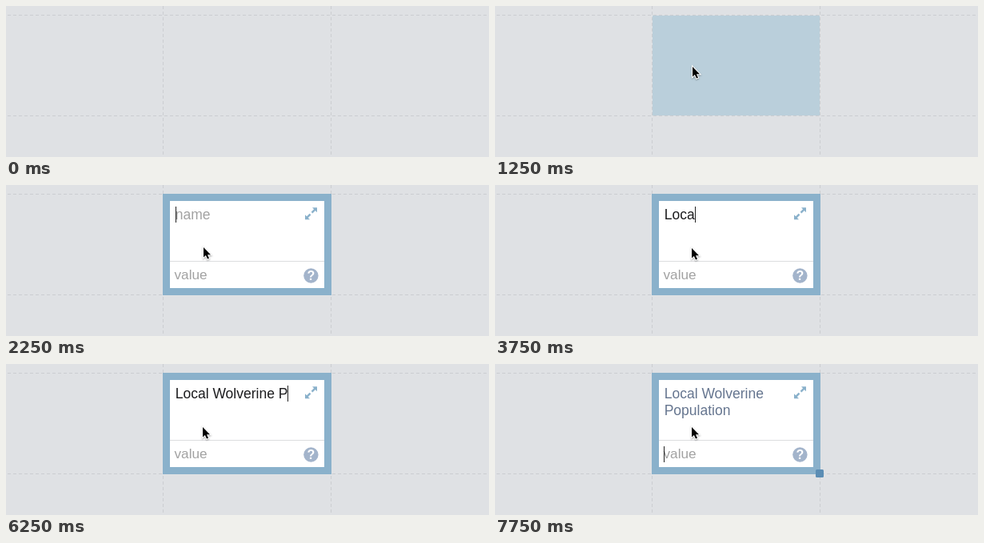
Animation of 604 by 189 pixels, one loop 8000 ms. Source, as an HTML page with a canvas:

```html
<!DOCTYPE html>
<html lang="en">
<head>
<meta charset="utf-8">
<title>Grid cell editor</title>
<style>
  html, body { margin: 0; width: 100%; height: 100%; overflow: hidden; background: #dfe1e4; }
  canvas { display: block; }
</style>
</head>
<body>
<canvas width="604" height="189"></canvas>
<script>
const ctx = document.querySelector('canvas').getContext('2d');
const LOOP = 8000, STEP = 250;
const FONT = '"Liberation Sans", Arial, sans-serif';
const BLUE = '#8ab1cb';

// [start time, text typed so far]
const typing = [
  [3250, 'L'], [3750, 'Loca'], [4000, 'Local '],
  [4500, 'Local W'], [4750, 'Local Wo'], [5000, 'Local Wol'], [5250, 'Local Wolv'], [5500, 'Local Wolver'],
  [5750, 'Local Wolverin'], [6000, 'Local Wolverine'], [6250, 'Local Wolverine P'], [6500, 'Local Wolverine Po'],
  [6750, 'Local Wolverine\nPop'], [7000, 'Local Wolverine\nPopul'],
  [7250, 'Local Wolverine\nPopulatio'], [7500, 'Local Wolverine\nPopulation']
];
// [start time, tip x, tip y]
const pointer = [
  [500, 238, 92], [750, 242, 84], [1000, 245, 78], [1250, 246, 75], [2250, 246, 77], [2500, 245, 78]
];

const latest = (track, t) => track.filter(key => key[0] <= t).pop();

function rect(color, x, y, w, h) {
  ctx.fillStyle = color;
  ctx.fillRect(x, y, w, h);
}

function polygon(points) {
  ctx.beginPath();
  points.forEach(([x, y]) => ctx.lineTo(x, y));
  ctx.closePath();
}

function text(string, x, baseline, color, size = 17.5) {
  ctx.font = `${size}px ${FONT}`;
  ctx.fillStyle = color;
  ctx.fillText(string, x, baseline);
}

const caret = (x, y) => rect('#222', Math.round(x), y, 1, 20);

function drawGrid() {
  rect('#dfe1e4', 0, 0, 604, 189);
  ctx.strokeStyle = '#cbcdd1';
  ctx.lineWidth = 1;
  ctx.setLineDash([4, 3]);
  ctx.beginPath();
  for (const y of [11.5, 137.5]) { ctx.moveTo(2, y); ctx.lineTo(604, y); }
  for (const x of [196.5, 406.5]) { ctx.moveTo(x, 0); ctx.lineTo(x, 189); }
  ctx.stroke();
  ctx.setLineDash([]);
}

function drawExpandIcon() {
  for (const turn of [0, Math.PI]) {
    ctx.save();
    ctx.translate(381.5, 35.7);
    ctx.rotate(turn);
    ctx.fillStyle = ctx.strokeStyle = BLUE;
    polygon([[1.5, -7.5], [7.5, -7.5], [7.5, -1.5]]);
    ctx.fill();
    ctx.lineWidth = 2.4;
    ctx.beginPath();
    ctx.moveTo(1, -1);
    ctx.lineTo(6, -6);
    ctx.stroke();
    ctx.restore();
  }
}

function drawHelpIcon() {
  ctx.fillStyle = '#a3b4cb';
  ctx.beginPath();
  ctx.arc(381.4, 113.5, 9.2, 0, 7);
  ctx.fill();
  ctx.textAlign = 'center';
  text('?', 381.4, 119, '#fff', 'bold 16');
  ctx.textAlign = 'left';
}

function drawEditor(t) {
  const typed = latest(typing, t);
  const valueFocused = t >= 7750;
  rect('#fff', 205, 20, 193, 109);
  rect('#dcdddf', 205, 95, 193, 1);
  drawExpandIcon();
  drawHelpIcon();
  text('value', 210.5, 118, '#a2a2a2', 17.2);

  if (typed) {
    const lines = typed[1].split('\n');
    lines.forEach((line, i) => text(line, 211.7, 43 + 21 * i, valueFocused ? '#65758f' : '#1c1c1e'));
    const last = lines.length - 1;
    if (!valueFocused) caret(211.7 + ctx.measureText(lines[last]).width, 27 + 21 * last);
  } else {
    text('name', 211.7, 43, '#a2a2a2');
    if (t < 2750) caret(212, 27);
  }

  if (valueFocused) {
    caret(211, 103);
    ctx.fillStyle = '#5b8db4';
    ctx.beginPath();
    ctx.roundRect(401, 132, 10, 10, 1.5);
    ctx.fill();
  }
}

function drawPointer(x, y) {
  ctx.save();
  ctx.translate(x + 1, y + 1);
  polygon([[0, 0], [0, 12.6], [2.9, 9.9], [5, 14.6], [7, 13.7], [5, 9.2], [9, 9.2]]);
  ctx.strokeStyle = '#fff';
  ctx.lineWidth = 2;
  ctx.shadowColor = 'rgba(0,0,0,.35)';
  ctx.shadowBlur = 2;
  ctx.shadowOffsetY = 1;
  ctx.stroke();
  ctx.shadowColor = 'transparent';
  ctx.fillStyle = '#000';
  ctx.fill();
  ctx.restore();
}

function draw(now) {
  const t = Math.floor(now % LOOP / STEP) * STEP;
  drawGrid();
  if (t >= 1750) rect(BLUE, 196, 11, 211, 127);
  else if (t >= 500) rect(t < 750 ? '#cbd7df' : '#bacfdb', 197, 12, 209, 125);
  if (t >= 2250) drawEditor(t);
  const tip = latest(pointer, t);
  if (tip) drawPointer(tip[1], tip[2]);
}

const start = performance.now();
(function tick() {
  draw(performance.now() - start);
  requestAnimationFrame(tick);
})();
</script>
</body>
</html>
```
